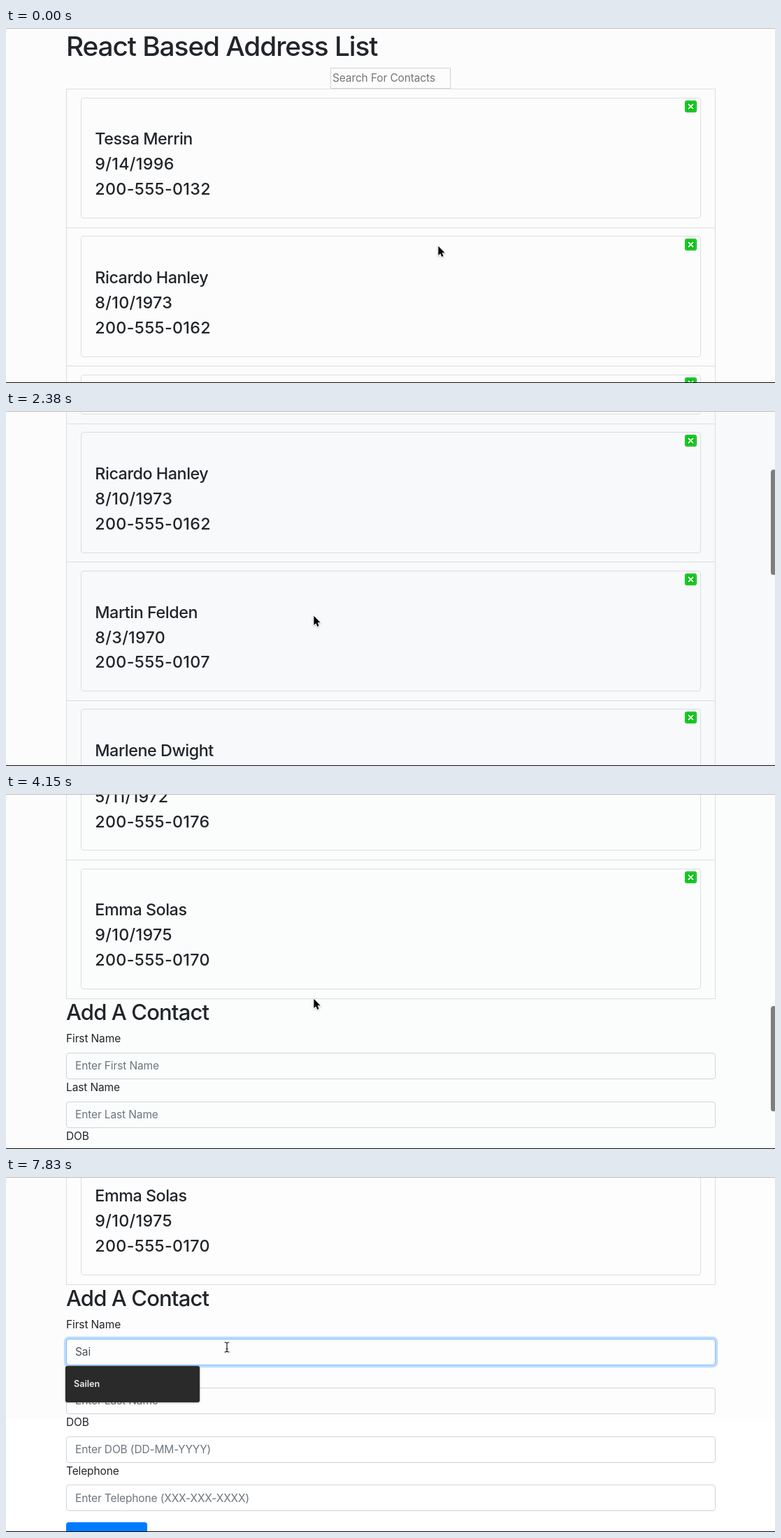
Animation of 1100 by 509 pixels, one loop 8 s. Source, as an HTML page:

```html
<!DOCTYPE html>
<html lang="en">
<head>
<meta charset="utf-8">
<title>Address List</title>
<style>
@property --s { syntax: "<number>"; inherits: true; initial-value: 0; }

html, body { margin: 0; width: 100%; height: 100%; overflow: hidden; background: #fcfcfc; }
body { font-family: Inter, "Open Sans", sans-serif; font-optical-sizing: none; color: #212529; }
div, svg { position: absolute; box-sizing: border-box; }

#stage { left: 0; top: 0; width: 1100px; height: 509px; overflow: hidden; animation: scroll 8s step-end infinite; }
#pane { left: 86px; top: 0; right: 0; bottom: 0; animation: pane 8s step-end infinite; }
#band { left: 0; top: 347px; right: 0; bottom: 0; background: #fff; animation: band 8s step-end infinite; }
#page { left: 0; top: 0; width: 1100px; height: 1700px; transform: translateY(calc(var(--s) * -1px)); }
#top, #bottom { left: 0; width: 1100px; height: 1px; background: #bcbcbc; }
#top { top: 0; }
#bottom { top: 508px; background: #0a0a0a; }
#thumb {
  left: 1094px; top: 2px; width: 8px; height: 151px; border-radius: 4px; background: #7e7e7e;
  transform: translateY(calc(var(--s) * .3065px)); animation: thumb 8s step-end infinite;
}

/* text is placed by the centre of its line */
.t { line-height: 0; white-space: pre; font-size: 15.5px; letter-spacing: -.13px; }
.h1, .h2 { left: 86px; font-weight: 500; letter-spacing: -.028em; }
.h1 { top: 26px; font-size: 38.8px; }
.h2 { top: 1299px; font-size: 31px; }
.name, .num { left: 19.3px; font-size: 23.3px; font-weight: 500; letter-spacing: -.019em; }
.num { letter-spacing: .32px; }
.hint { color: #6c757d; }

#search { left: 464px; top: 57px; width: 172px; height: 30px; border: 1px solid #d2d2d2; }
#search .t { left: 2px; top: 14px; color: #757575; }
.item { left: 86px; width: 929px; height: 199.6px; border: 1px solid #dcdddd; }
.card { left: 20px; top: 11.6px; width: 887px; height: 173.5px; border: 1px solid #dcdddd; border-radius: 4px; }
.card svg { left: 863.3px; top: 3px; }
.label { left: 86px; }
.field { left: 86px; width: 929px; height: 38px; border: 1px solid #ced4da; border-radius: 4px; }
.field .t { left: 12px; top: 18.3px; }
#button { left: 86px; top: 1620px; width: 116px; height: 38px; border-radius: 4px; background: #007bff; }

#first { animation: hint 8s step-end infinite; }
#ring {
  left: 86px; top: 232px; width: 929px; height: 38px; border: 1px solid #80bdff; border-radius: 4px;
  box-shadow: 0 0 0 3.2px rgba(0, 123, 255, .25); opacity: 0; animation: ring 8s step-end infinite;
}
#typed { left: 99px; top: 251px; color: #495057; }
#typed span { opacity: 0; animation: key1 8s step-end infinite; }
#typed span:nth-child(2) { animation-name: key2; }
#typed span:nth-child(3) { animation-name: key3; }
#caret { left: 98px; top: 242px; width: 1px; height: 17px; background: #333; opacity: 0; animation: caret 8s step-end infinite; }

.menu {
  left: 85px; top: 271px; border-radius: 3px; background: #2a2a2a; overflow: hidden; opacity: 0;
  box-shadow: 0 0 2px rgba(0, 0, 0, .45), 0 1px 3px rgba(0, 0, 0, .2);
}
.menu .t { left: 12px; font-size: 12px; letter-spacing: 0; color: #a2a2a2; }
.menu .b { font-size: 12.6px; font-weight: 600; color: #ececec; }
#all { width: 203.5px; height: 172px; animation: all 8s step-end infinite; }
#one { width: 191.5px; height: 51.5px; animation: one 8s step-end infinite; }
#manage { left: 0; top: 131px; width: 100%; height: 41px; border-top: 1px solid #464646; background: #343434; }

#arrow, #beam { left: 0; top: 0; overflow: visible; }
#arrow { filter: drop-shadow(0 1px 1px rgba(0, 0, 0, .25)); animation: arrow 8s step-end infinite; }
#beam { opacity: 0; animation: beam 8s step-end infinite; }

@keyframes scroll {
  0% { --s: 0; }
  22.2% { --s: 104; } 24.1% { --s: 178; } 25.95% { --s: 212; }
  29.7% { --s: 268; } 31.55% { --s: 326; } 33.3% { --s: 352; }
  37.1% { --s: 402; } 38.95% { --s: 560; } 40.8% { --s: 648; }
  44.45% { --s: 762; } 46.3% { --s: 868; } 48.2% { --s: 918; }
  51.85% { --s: 986; } 53.7% { --s: 1082; } 55.45%, 100% { --s: 1125; }
}
@keyframes thumb {
  0% { opacity: 0; }
  22.2% { opacity: 1; }
  59.2% { opacity: .75; } 60.95% { opacity: .4; } 62.7% { opacity: .12; }
  64.45%, 100% { opacity: 0; }
}
@keyframes pane {
  0% { background: #fcfcfc; }
  22.2% { background: #f8f9fb; }
  44.45% { background: #fbfdfd; }
  55.45%, 100% { background: #fdfdfd; }
}
@keyframes band { 0% { opacity: 0; } 55.45%, 100% { opacity: 1; } }
@keyframes arrow {
  0% { transform: translate(618px, 312px); }
  5.6% { transform: translate(596px, 262px); }
  7.45% { transform: translate(552px, 190px); }
  9.3% { transform: translate(500px, 128px); }
  11.1% { transform: translate(452px, 168px); }
  12.95% { transform: translate(430px, 262px); }
  14.8% { transform: translate(431px, 353px); }
  16.7% { transform: translate(440px, 293px); }
  59.2% { transform: translate(428px, 284px); }
  60.95% { transform: translate(411px, 270px); }
  62.7% { transform: translate(398px, 259px); }
  64.45% { transform: translate(390px, 252px); opacity: 1; }
  69.8%, 100% { transform: translate(390px, 252px); opacity: 0; }
}
@keyframes beam {
  0% { transform: translate(340px, 252px); opacity: 0; }
  69.8% { transform: translate(340px, 252px); opacity: 1; }
  71.7% { transform: translate(322px, 246px); opacity: 1; }
  73.6%, 100% { transform: translate(316px, 244px); opacity: 1; }
}
@keyframes ring { 0% { opacity: 0; } 73.6%, 100% { opacity: 1; } }
@keyframes hint { 0% { opacity: 1; } 81.1%, 100% { opacity: 0; } }
@keyframes key1 { 0% { opacity: 0; } 81.1%, 100% { opacity: 1; } }
@keyframes key2 { 0% { opacity: 0; } 84.8%, 100% { opacity: 1; } }
@keyframes key3 { 0% { opacity: 0; } 92.2%, 100% { opacity: 1; } }
@keyframes caret {
  0% { opacity: 0; transform: none; }
  73.6% { opacity: 1; transform: none; }
  81.1% { opacity: 1; transform: translateX(11px); }
  84.8% { opacity: 1; transform: translateX(19px); }
  86.7% { opacity: 0; transform: translateX(19px); }
  92.2% { opacity: 1; transform: translateX(23px); }
  97.8%, 100% { opacity: 0; transform: translateX(23px); }
}
@keyframes all { 0% { opacity: 0; } 75.45% { opacity: 1; } 82.95%, 100% { opacity: 0; } }
@keyframes one { 0% { opacity: 0; } 82.95%, 100% { opacity: 1; } }
</style>
</head>
<body>
<div id="stage">
  <div id="pane"></div>
  <div id="band"></div>
  <div id="page">
    <div class="t h1">React Based Address List</div>
    <div id="search"><div class="t">Search For Contacts</div></div>
    <div class="t h2">Add A Contact</div>
    <div id="button"></div>
  </div>

  <div id="ring"></div>
  <div id="typed" class="t"><span>S</span><span>a</span><span>i</span></div>
  <div id="caret"></div>

  <div id="all" class="menu">
    <div class="t b" style="top:26px">2005550187</div>
    <div class="t" style="top:47px">Sailen Dhamkol</div>
    <div class="t b" style="top:84px">2005550187</div>
    <div class="t" style="top:105px">The City College of New York</div>
    <div id="manage"><div class="t" style="top:21px">Manage...</div></div>
  </div>
  <div id="one" class="menu"><div class="t b" style="top:26px">Sailen</div></div>

  <div id="thumb"></div>
  <svg id="arrow" width="12" height="18">
    <path d="M.4 .8V14L3.4 11.2 5.4 15.9 7.6 15 5.6 10.3H9.6Z" fill="#000" stroke="#fff" stroke-width="1.6" paint-order="stroke"/>
  </svg>
  <svg id="beam" width="8" height="16">
    <path d="M-3.5 -7Q0 -7 0 -5Q0 -7 3.5 -7M0 -5V5M-3.5 7Q0 7 0 5Q0 7 3.5 7M-1.5 2.5H1.5" fill="none" stroke="#222" stroke-width="1.2"/>
  </svg>
  <div id="top"></div>
  <div id="bottom"></div>
</div>

<script>
const contacts = [
  ["Tessa Merrin", "9/14/1996", "200-555-0132"],
  ["Ricardo Hanley", "8/10/1973", "200-555-0162"],
  ["Martin Felden", "8/3/1970", "200-555-0107"],
  ["Marlene Dwight", "10/28/1967", "200-555-0149"],
  ["Lorna Whitby", "5/11/1972", "200-555-0176"],
  ["Emma Solas", "9/10/1975", "200-555-0170"]
];
const fields = [
  ["First Name", "Enter First Name"],
  ["Last Name", "Enter Last Name"],
  ["DOB", "Enter DOB (DD-MM-YYYY)"],
  ["Telephone", "Enter Telephone (XXX-XXX-XXXX)"]
];
const page = document.getElementById("page");
const add = html => page.insertAdjacentHTML("beforeend", html);

const cross = `<svg width="17" height="17" viewBox="0 0 16 16">
  <rect width="16" height="16" rx="3" fill="#08b51a"/>
  <rect x="1.5" y="1.5" width="13" height="13" rx="1.5" fill="#00c40c" stroke="#62d86a" stroke-width=".7"/>
  <path d="M4.6 4.6L11.4 11.4M11.4 4.6L4.6 11.4" stroke="#fff" stroke-width="1.8"/>
</svg>`;

contacts.forEach(([name, born, phone], i) => add(
  `<div class="item" style="top:${87 + i * 198.6}px"><div class="card">${cross}
    <div class="t name" style="top:58.9px">${name}</div>
    <div class="t num" style="top:94.9px">${born}</div>
    <div class="t num" style="top:130.6px">${phone}</div>
  </div></div>`));

fields.forEach(([label, hint], i) => {
  const y = i * 69.9;
  add(`<div class="t label" style="top:${1337 + y}px">${label}</div>
    <div class="field" style="top:${1356.7 + y}px">
      <div class="t hint"${i ? "" : ' id="first"'}>${hint}</div>
    </div>`);
});
</script>
</body>
</html>
```
